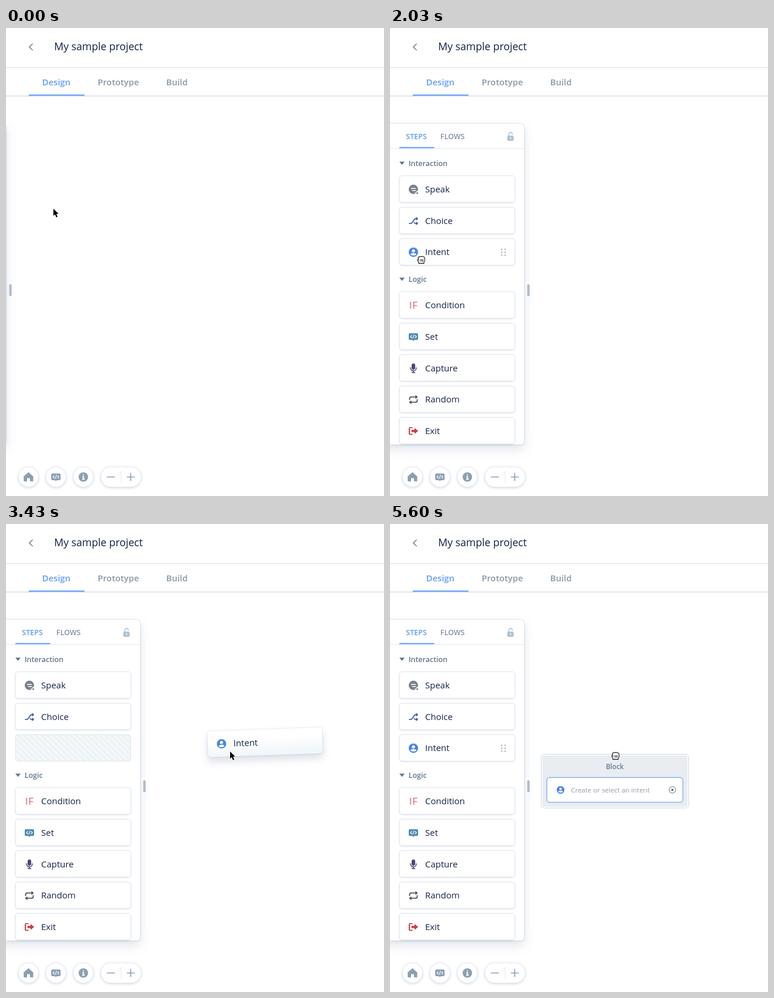
An HTML page for the animation above (5.67 s loop, 646 px wide and 800 px high).

```html
<!DOCTYPE html>
<html lang="en">
<head>
<meta charset="utf-8">
<title>Flow designer</title>
<style>
  html, body { margin: 0; width: 100%; height: 100%; overflow: hidden; background: #fff; }
  svg { display: block; width: 100vw; height: 100vh; }
  text { font-family: "Open Sans", "Noto Sans", sans-serif; fill: #132144; white-space: pre; }
  .semi { font-weight: 600; }
  .line { fill: none; stroke-linecap: round; stroke-linejoin: round; }
  .panel { filter: drop-shadow(0 0 1.5px rgba(17,49,96,.24)) drop-shadow(0 8px 9px rgba(17,49,96,.13)); }
  .card { fill: #fff; stroke: #dfe4ea; filter: drop-shadow(0 1px 1px rgba(17,49,96,.13)); }
  .lift { filter: drop-shadow(0 0 1px rgba(17,49,96,.22)) drop-shadow(0 8px 7px rgba(17,49,96,.15)); }
  .button { fill: #fff; stroke: #e8ecf1; stroke-width: .8; filter: drop-shadow(0 1px 2px rgba(17,49,96,.22)); }
</style>
</head>
<body>
<svg viewBox="0 0 646 800" xmlns="http://www.w3.org/2000/svg">
  <defs>
    <pattern id="hatch" width="7" height="7" patternUnits="userSpaceOnUse" patternTransform="rotate(-45)">
      <rect width="7" height="7" fill="#eef3f5"/>
      <rect width="1.6" height="7" fill="#fbfdfd"/>
    </pattern>
    <linearGradient id="sheen" x1="0" y1="0" x2=".15" y2="1">
      <stop offset=".4" stop-color="#fff"/>
      <stop offset="1" stop-color="#f1f6f8"/>
    </linearGradient>
    <g id="speak">
      <path fill="#7b818c" d="M0-8A8 8 0 1 1 0 8A8 8 0 1 1 0-8ZM2 7L8 8L7 2Z"/>
      <path class="line" stroke="#fff" stroke-width="1.5" d="M-3.6-1.6H3.6M-1.6 1.8H3.6"/>
    </g>
    <g id="choice">
      <path class="line" stroke="#3c5a92" stroke-width="1.7"
        d="M-7 4.5H-4.5C-1 4.5 0-3.5 3.5-3.5H6M1.2 3C2 4 2.7 4.5 3.7 4.5H6"/>
      <path fill="#3c5a92" d="M4.5-6.7L8.3-3.5L4.5-.3ZM4.5 1.3L8.3 4.5L4.5 7.7Z"/>
    </g>
    <g id="intent">
      <circle r="8" fill="#4a83e6"/>
      <circle cy="-2.3" r="2.7" fill="#fff"/>
      <path fill="#fff" d="M-5 3.8C-4 .7 4 .7 5 3.8C3 6.4-3 6.4-5 3.8Z"/>
    </g>
    <g id="condition">
      <text x="-7.2" y="6" font-size="17" letter-spacing=".8" style="fill:#e0607a">IF</text>
    </g>
    <g id="code">
      <path d="M-6-6H6Q8-6 8-4V3.5Q8 5.5 6 5.5H2L0 7L-2 5.5H-6Q-8 5.5-8 3.5V-4Q-8-6-6-6Z"/>
      <path class="line" stroke="#fff" stroke-width="1.2" d="M-3-2.4L-5.2-.2L-3 2M3-2.4L5.2-.2L3 2M1-3L-1 2.6"/>
    </g>
    <g id="set" fill="#4f8cb2"><use href="#code"/></g>
    <g id="capture">
      <rect x="-3" y="-8" width="6" height="10.5" rx="3" fill="#4f4376"/>
      <path class="line" stroke="#4f4376" stroke-width="1.5" d="M-5-.8C-5 6.2 5 6.2 5-.8M0 4.5V7.3M-2.6 7.5H2.6"/>
    </g>
    <g id="random">
      <path class="line" stroke="#4b555c" stroke-width="1.8" d="M-6.5 0V-1.5Q-6.5-4.5-3.5-4.5H4M6.5 0V1.5Q6.5 4.5 3.5 4.5H-4"/>
      <path fill="#4b555c" d="M3.5-8L7.6-4.5L3.5-1ZM-3.5 8L-7.6 4.5L-3.5 1Z"/>
    </g>
    <g id="exit">
      <path class="line" stroke="#cf3843" stroke-width="1.9" d="M-2.5-5.7H-5.5Q-7-5.7-7-4.2V4.2Q-7 5.7-5.5 5.7H-2.5"/>
      <path fill="#cf3843" d="M-3.2-1.8H2V-5L8 0L2 5V1.8H-3.2Z"/>
    </g>
    <g id="grips" fill="#bac5d0"></g>
  </defs>

  <rect width="646" height="800" fill="#fff"/>

  <g id="header">
    <path class="line" stroke="#8d9cae" stroke-width="2" d="M45 27.5L39.8 32.5L45 37.5"/>
    <text x="82.3" y="38" font-size="17.7">My sample project</text>
    <path d="M0 67.5H646" stroke="#e1e5ea" stroke-width="1.3"/>
    <path d="M0 116.2H646" stroke="#e0e3e7" stroke-width="2"/>
    <rect x="39" y="113.7" width="95" height="2" fill="#5d9cf2"/>
    <g class="semi" font-size="14.8">
      <text x="61.8" y="98" style="fill:#659df0">Design</text>
      <text x="156.7" y="98" style="fill:#8d98a7">Prototype</text>
      <text x="273.8" y="98" style="fill:#8d98a7">Build</text>
    </g>
  </g>

  <g id="toolbar" fill="#8c9eb2">
    <circle class="button" cx="38.5" cy="767.5" r="17"/>
    <circle class="button" cx="85.3" cy="767.5" r="17"/>
    <circle class="button" cx="132.2" cy="767.5" r="17"/>
    <rect class="button" x="162" y="750.5" width="69" height="34" rx="17"/>
    <path d="M38.4 759.3L46.6 766.5V773.5Q46.6 775 45 775H41V769.5H36V775H32Q30.3 775 30.3 773.5V766.5Z"/>
    <use href="#code" transform="translate(85.3 767.5)"/>
    <circle cx="132.2" cy="767.5" r="8"/>
    <path class="line" stroke="#fff" stroke-width="2" d="M132.2 763.5V763.6M131.3 766.8H132.4V771.3M131 771.3H133.6"/>
    <path class="line" stroke="#8c9eb2" stroke-width="1.6" d="M173 767.5H185.5M207 767.5H219.5M213.2 761.3V773.7"/>
    <path d="M196.7 757V778" stroke="#e3e8ee"/>
  </g>

  <g id="block">
    <rect x="258.5" y="393.5" width="252" height="92" rx="5" fill="#fff" stroke="#c9d9e6"/>
    <rect x="260.5" y="395.5" width="248" height="88" rx="4" fill="#e9edf2"/>
    <text class="semi" x="384.2" y="418.6" font-size="11.7" text-anchor="middle" style="fill:#6a7a8d">Block</text>
    <rect x="268" y="433.3" width="232.5" height="42.4" rx="4.5" fill="#fff" stroke="#78a9ea" stroke-width="1.3"/>
    <use href="#intent" transform="translate(291.5 454.5) scale(.82)"/>
    <text x="309.2" y="459" font-size="11.5" style="fill:#929ba9">Create or select an intent</text>
    <circle cx="482.6" cy="454.5" r="5.6" fill="none" stroke="#7f8d9c" stroke-width="1.1"/>
    <circle cx="482.6" cy="454.5" r="2" fill="#62707f"/>
  </g>

  <g id="panel">
    <rect class="panel" x="-12" y="164" width="241" height="548" rx="5" fill="#fff"/>
    <g class="semi" font-size="12.5">
      <text x="27.3" y="189.6" style="fill:#5d9cf2">STEPS</text>
      <text x="86" y="189.6" style="fill:#8191a4">FLOWS</text>
      <text x="31.7" y="235.5" style="fill:#62748a">Interaction</text>
      <text x="31.7" y="433.7" style="fill:#62748a">Logic</text>
    </g>
    <path d="M0 206H229" stroke="#e3e8ed"/>
    <rect x="16" y="203.5" width="59.5" height="2" fill="#5d9cf2"/>
    <rect x="200.5" y="184" width="11" height="8.7" rx="2" fill="#afc2d1"/>
    <path class="line" stroke="#afc2d1" stroke-width="1.5" d="M203 184V181.8C203 177.5 209 177.5 209 181.8"/>
    <path class="line" stroke="#fff" stroke-width="1.5" d="M206 187.3V189.3"/>
    <path id="arrows" fill="#62748a" d="M16 228.5H25L20.5 234ZM16 426.7H25L20.5 432.2Z"/>
    <g id="cards"></g>
    <rect id="slot" x="16.2" y="360" width="197" height="45.3" rx="4.5" fill="url(#hatch)" stroke="#dce4e9"/>
    <rect x="234.5" y="438" width="4.2" height="20.5" rx="2" fill="#b1bccc"/>
  </g>

  <g id="drag">
    <rect class="lift" x="-98" y="-22.2" width="196" height="44.4" rx="4" fill="url(#sheen)"/>
    <use href="#intent" x="-74.5" y="0"/>
    <text x="-54.2" y="5.2" font-size="15">Intent</text>
  </g>

  <g id="arrow">
    <path d="M0 0V12.2L2.8 9.6L4.9 14.7L7.1 13.7L5 8.8H8.8Z" fill="#000" stroke="#fff" stroke-width="1.4"
      stroke-linejoin="round" paint-order="stroke"/>
  </g>
  <g id="hand">
    <path fill="#fff" stroke="#111" stroke-width="1.1" stroke-linejoin="round"
      d="M-2.6 13.4V11.4L-4.6 8.3Q-5 6.3-3 6.6L-3.4 3.4Q-2.6 1.2-.9 2.5Q.4.3 2.2 2Q3.8.4 5.2 2.4Q7.4 1.6 7.8 4V7.8Q7.6 10 6.4 11.5V13.4Z"
      transform="translate(.6 0)"/>
    <path class="line" stroke="#111" stroke-width=".9" d="M-2.3 6.7L-1.7 8.4M1.2 6.5V10M3.3 6.5V10M5.3 6.5V10"/>
  </g>
</svg>

<script>
const LOOP = 5670, STEP = 70;
const GRAB = 2240, DROP = 3640;
const LAG = 20;
const CARD_H = 45.3;
const $ = id => document.getElementById(id);

// Step cards: label and top edge
const cards = [
  ["Speak", 252.6], ["Choice", 306.3], ["Intent", 360],
  ["Condition", 450.8], ["Set", 504.5], ["Capture", 558.2], ["Random", 611.9], ["Exit", 665.6]
];

// Pointer path: time, x, y
const path = [
  [0, 81, 309], [140, 76, 309], [350, 35, 305], [560, 10, 303], [770, 11, 302], [1050, 13, 302],
  [1260, 19, 309], [1540, 38, 345], [1820, 50, 385], [1960, 51, 389], [GRAB, 51, 389],
  [2520, 115, 352], [2730, 215, 325], [2940, 303, 319], [3220, 367, 365], [3430, 383, 389]
];

function build() {
  $("grips").innerHTML = [0, 1, 2, 3, 4, 5].map(i =>
    `<rect x="${189.7 + i % 2 * 5.6}" y="${-6.3 + (i >> 1) * 5}" width="2.8" height="2.8" rx=".8"/>`).join("");
  $("cards").innerHTML = cards.map(([label, y]) => {
    const mid = y + CARD_H / 2;
    return `<g id="card${label}">
      <rect class="card" x="16.2" y="${y}" width="197" height="${CARD_H}" rx="4.5"/>
      <use href="#${label.toLowerCase()}" transform="translate(40 ${mid + .6})"/>
      <text x="60" y="${mid + 5.8}" font-size="15">${label}</text>
      <use id="grip${label}" href="#grips" transform="translate(0 ${mid + .6})"/>
    </g>`;
  }).join("");
}

// Smooth interpolation that never overshoots its points
function sample(t, axis) {
  const last = path.length - 1;
  if (t >= path[last][0]) return path[last][axis];
  let i = 0;
  while (path[i + 1][0] <= t) i++;
  const slope = k => (path[k + 1][axis] - path[k][axis]) / (path[k + 1][0] - path[k][0]);
  const tangent = k => {
    if (k === 0 || k === last) return 0;
    const a = slope(k - 1), b = slope(k);
    return a * b > 0 ? 2 * a * b / (a + b) : 0;
  };
  const span = path[i + 1][0] - path[i][0], u = (t - path[i][0]) / span, v = 1 - u;
  return path[i][axis] * (1 + 2 * u) * v * v + path[i + 1][axis] * u * u * (3 - 2 * u)
    + span * (tangent(i) * u * v * v - tangent(i + 1) * u * u * v);
}

const show = (id, on) => $(id).setAttribute("display", on ? "inline" : "none");
const move = (id, x, y, extra = "") => $(id).setAttribute("transform", `translate(${x} ${y}) ${extra}`);

function draw(t) {
  const x = sample(t, 1), y = sample(t, 2);
  const dragging = t >= GRAB && t < DROP, dropped = t >= DROP;

  const open = Math.min(1, Math.max(0, (t - 490) / 280));
  move("panel", -229 * Math.pow(1 - open, 3), 0);

  let hover = dropped ? "Intent" : "";
  for (const [label, top] of cards) {
    if (!dragging && !dropped && open === 1 && x >= 16 && y >= top && y <= top + CARD_H) hover = label;
  }
  for (const [label] of cards) show("grip" + label, label === hover);

  show("cardIntent", !dragging);
  show("slot", dragging);
  show("drag", dragging);
  show("block", dropped);
  move("drag", sample(t - LAG, 1) + 60, sample(t - LAG, 2) - 15.5, "rotate(-2)");

  show("hand", hover);
  show("arrow", !hover);
  move("hand", x, y);
  move("arrow", x, y);
}

build();
const start = performance.now();
function tick() {
  const t = (performance.now() - start) % LOOP;
  draw(Math.floor(t / STEP) * STEP);
  requestAnimationFrame(tick);
}
tick();
</script>
</body>
</html>
```
